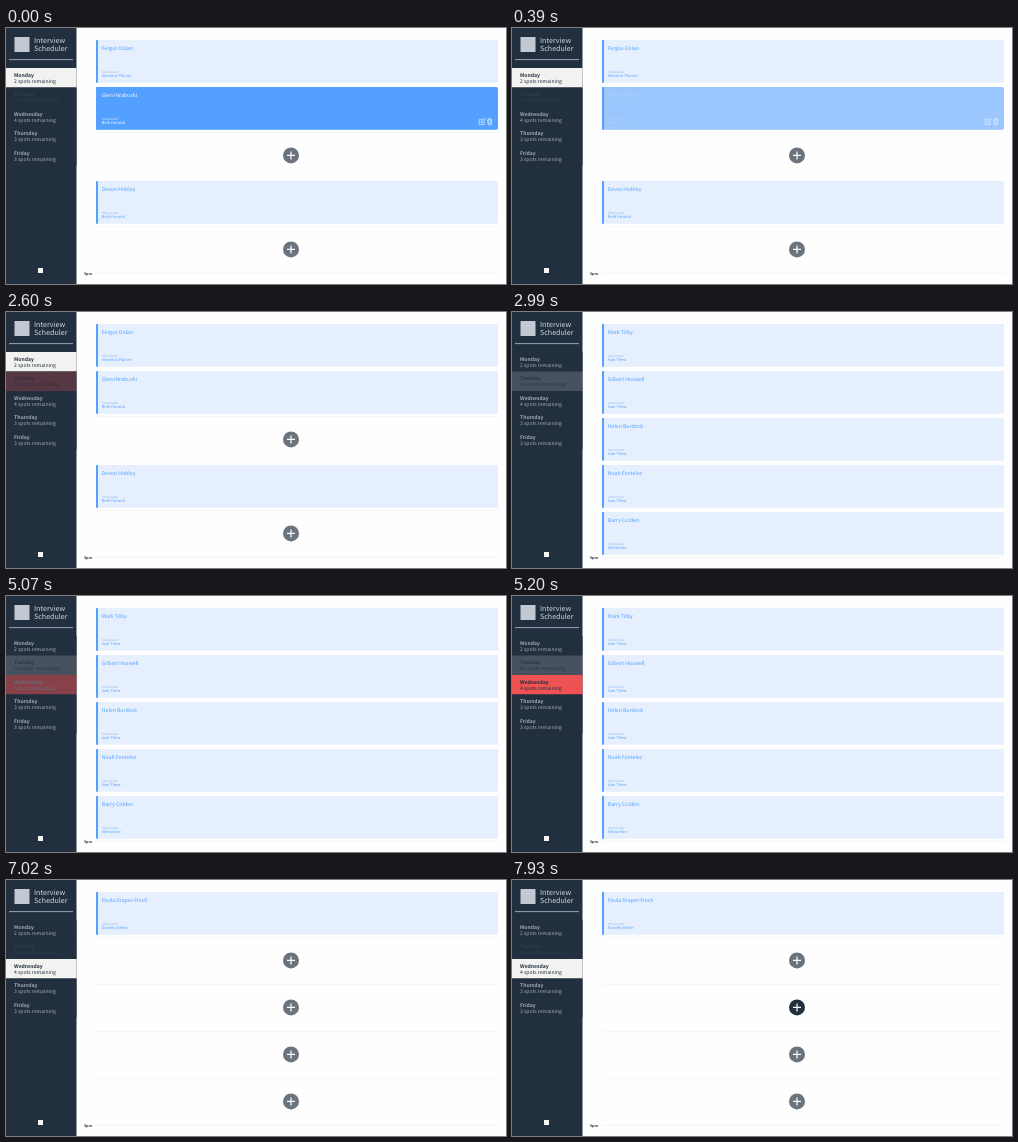
These frames come from a looping animation (500 px wide and 256 px high, 8000 ms). An HTML page:

```html
<!DOCTYPE html>
<html lang="en">
<head>
<meta charset="utf-8">
<title>Interview Scheduler</title>
<style>
  html, body { margin: 0; width: 100%; height: 100%; overflow: hidden; background: #fefefe; }
  svg { display: block; width: 100vw; height: 100vh; }
  text {
    font-family: "Noto Sans CJK JP", "Noto Sans CJK SC", "Noto Sans CJK", "Noto Sans", sans-serif;
    text-rendering: geometricPrecision;
    white-space: pre;
  }
</style>
</head>
<body>
<svg id="stage" viewBox="0 0 500 256"></svg>
<script>
const LOOP = 8000, TICK = 130;
const NAVY = '#222f3e', BLUE = '#54a0ff', RED = [238, 82, 83];
const ROW = 47, TOP = 12, DAY = 19.5;
const stage = document.getElementById('stage');

function add(parent, tag, attrs, text) {
  const el = document.createElementNS('http://www.w3.org/2000/svg', tag);
  set(el, attrs);
  if (text) el.textContent = text;
  parent.appendChild(el);
  return el;
}
function set(el, attrs) {
  for (const k in attrs) el.setAttribute(k, attrs[k]);
}
const rect = (p, x, y, width, height, fill, rx = 0) =>
  add(p, 'rect', { x, y, width, height, fill, rx });
const label = (p, x, y, size, fill, str, weight = 400) =>
  add(p, 'text', { x, y, 'font-size': size, fill, 'font-weight': weight }, str);
const group = p => add(p, 'g', {});
const show = (el, on) => set(el, { visibility: on ? 'visible' : 'hidden' });

function mix(a, b, k) {
  return `rgb(${a.map((v, i) => Math.round(v + (b[i] - v) * k))})`;
}
// Stepped ramp from 0 to 1, one step per tick
function ramp(t, start, steps) {
  return Math.max(0, Math.min(1, (Math.floor((t - start) / TICK) + 1) / steps));
}

// Main panel
function cardText(p, y, student, mentor, main, faint) {
  label(p, 95.8, y + 10, 5.15, main, student, 500);
  label(p, 95.8, y + 32.6, 3.1, faint, 'Interviewer');
  label(p, 95.8, y + 37.3, 3.9, main, mentor, 500);
}
function card(p, row, student, mentor) {
  const y = TOP + row * ROW;
  rect(p, 90, y, 402, 42.8, '#e5effd', 1);
  rect(p, 90, y, 2, 42.8, BLUE, 0.6);
  cardText(p, y, student, mentor, BLUE, '#8fb8ee');
}
function activeCard(p, row, student, mentor) {
  const y = TOP + row * ROW, g = group(p);
  rect(g, 90, y, 402, 42.8, BLUE, 2);
  cardText(g, y, student, mentor, '#fff', '#d4e6ff');
  add(g, 'path', {
    d: `M476.2 ${y + 32.6}h-3v5h5v-2.8M475 ${y + 35.6}l.3-1.4 3-2.9 1.1 1.1-3 2.9z` +
       `M481.2 ${y + 33}h5M482.6 ${y + 32.8}v-1.1h2.2v1.1M481.8 ${y + 33}l.3 4.8h3.2l.3-4.8` +
       `M483 ${y + 34.4}v2.2M484.4 ${y + 34.4}v2.2`,
    fill: 'none', stroke: '#fff', 'stroke-width': 0.6
  });
  return g;
}
function plus(p, row) {
  const y = TOP + row * ROW + 21.5;
  rect(p, 90, y - 23.4, 402, 0.7, '#f5f5f5');
  const dot = add(p, 'circle', { cx: 285, cy: y - 0.1, r: 8, fill: '#6b737d' });
  add(p, 'path', { d: `M281 ${y - 0.1}h8M285 ${y - 4.1}v8`, stroke: '#fff', 'stroke-width': 1.2 });
  return dot;
}

rect(stage, 0, 0, 500, 256, '#fefefe');
rect(stage, 90, 244.8, 402, 0.7, '#efefef');
label(stage, 78, 246.8, 3.6, NAVY, '5pm', 700);

const monday = group(stage), tuesday = group(stage), wednesday = group(stage);
const booked = ['Glen Hirabushi', 'Beth Farwick'];

card(monday, 0, 'Fergus Dolan', 'Veronica Plumer');
card(monday, 1, ...booked);
plus(monday, 2);
card(monday, 3, 'Devon Hobley', 'Beth Farwick');
plus(monday, 4);
const active = activeCard(stage, 1, ...booked);

['Mark Tilby', 'Gilbert Hoxwell', 'Helen Burdock', 'Noah Fontelez', 'Barry Colden']
  .forEach((name, i) => card(tuesday, i, name, i < 4 ? 'Ivan Thew' : 'Selina Voe'));

card(wednesday, 0, 'Paula Draper-Finch', 'Dorothy Kelim');
const dots = [1, 2, 3, 4].map(row => plus(wednesday, row));

// Sidebar
rect(stage, 0, 0, 70.5, 256, NAVY);
rect(stage, 8.5, 9, 15, 15, '#c3c9d2');
label(stage, 28, 15.4, 7.1, '#d3d8de', 'Interview', 300);
label(stage, 28, 22.6, 7.1, '#d3d8de', 'Scheduler', 300);
rect(stage, 3, 31.2, 64, 0.9, '#a5b1c2');
rect(stage, 32, 240, 5, 5, '#f4f4f4');

const days = [['Monday', 2], ['Tuesday', 'no'], ['Wednesday', 4], ['Thursday', 3], ['Friday', 3]]
  .map(([name, spots], i) => {
    const y = 40 + i * DAY;
    return {
      full: spots === 'no',
      bg: rect(stage, 0, y, 70.5, DAY, NAVY),
      name: label(stage, 8, y + 8.5, 5.07, '#fff', name, 600),
      spots: label(stage, 8, y + 14.9, 5.07, '#fff', spots + ' spots remaining')
    };
  });

function paintDay(day, selected, hover) {
  const base = [34, 47, 62];
  let bg = NAVY, ink = day.full ? '#313e4d' : '#a3abb4';
  if (selected) {
    bg = day.full ? '#48525f' : '#f2f2f1';
    ink = day.full ? '#2a3542' : NAVY;
  } else if (hover) {
    bg = mix(base, RED, day.full ? hover * 0.25 : hover);
    ink = day.full ? '#36303d' : mix([163, 171, 180], base, hover);
  }
  set(day.bg, { fill: bg });
  set(day.name, { fill: ink });
  set(day.spots, { fill: ink });
}

function render(t) {
  const picked = t < 2990 ? 0 : t < 5720 ? 1 : 2;
  [monday, tuesday, wednesday].forEach((view, i) => show(view, i === picked));

  const glow = 1 - ramp(t, 390, 2);
  show(active, glow > 0);
  set(active, { opacity: glow });

  const hover = [0, t >= 2600 && t < 2990 ? 1 : 0, ramp(t, 5070, 2), 0, 0];
  days.forEach((day, i) => paintDay(day, i === picked, hover[i]));

  set(dots[1], { fill: mix([107, 115, 125], [34, 47, 62], ramp(t, 7540, 4)) });
}

const start = performance.now();
function frame() {
  render((performance.now() - start) % LOOP);
  requestAnimationFrame(frame);
}
render(0);
requestAnimationFrame(frame);
</script>
</body>
</html>
```
